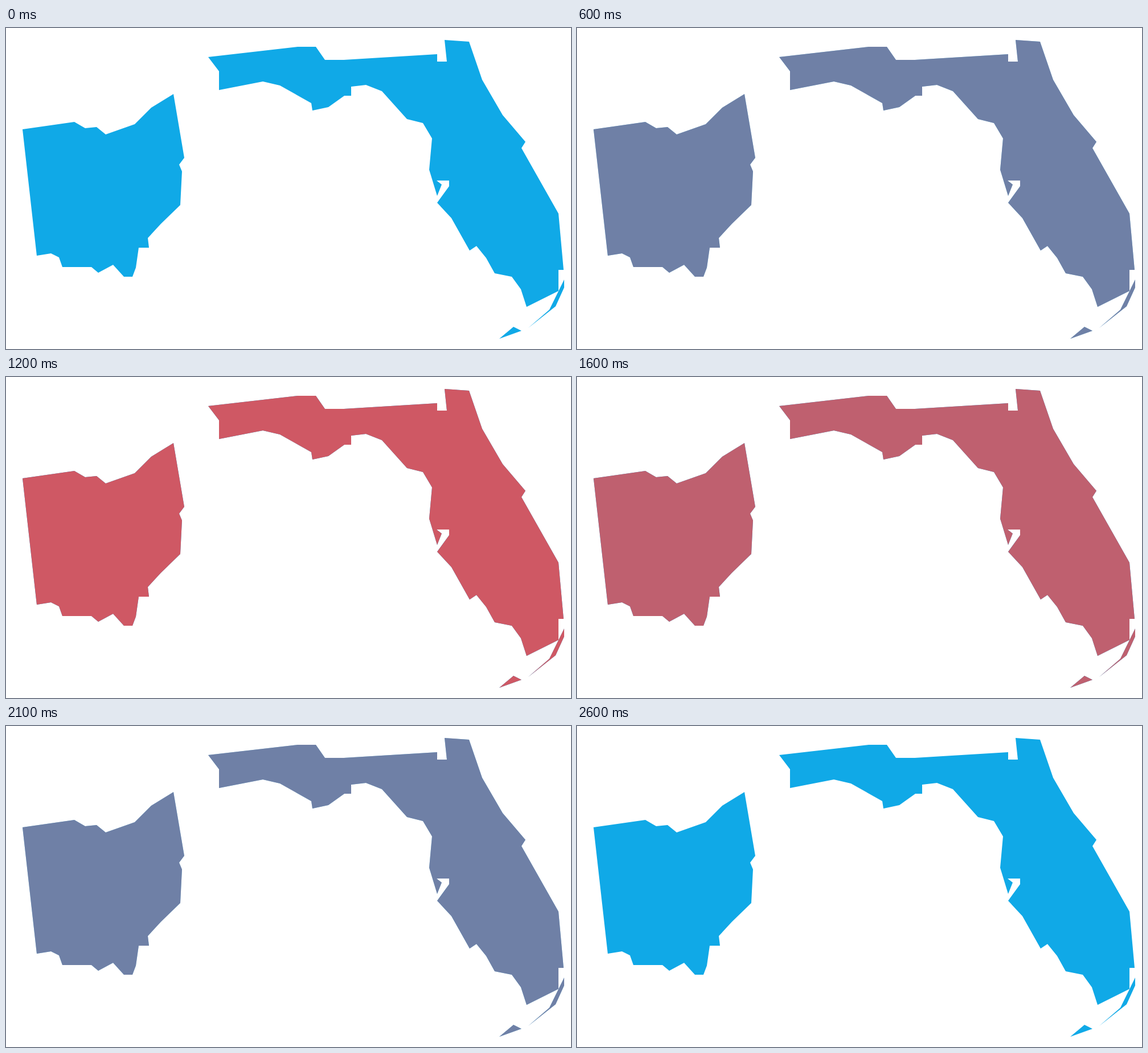
An HTML page that plays this animation: 992x564 px, repeating every 2.8 s.

```html
<!DOCTYPE html>
<html lang="en">
<head>
<meta charset="utf-8">
<title>Two states</title>
<style>
  html, body { margin: 0; width: 100%; height: 100%; overflow: hidden; background: #fff; }
  svg { display: block; width: 100%; height: 100%; }
  .base { fill: #10a9e7; }
  .tint { fill: #e0525a; opacity: 0; animation: fade 2800ms infinite; }

  /* Blue holds 200 ms at each end; 100 ms steps between. */
  @keyframes fade {
    0%       { opacity: 0; animation-timing-function: step-end; }
    7.1428%  { opacity: .1538; animation-timing-function: steps(12, jump-none); }
    50%      { opacity: 1; animation-timing-function: steps(12, jump-none); }
    92.857%  { opacity: .1538; animation-timing-function: step-end; }
    92.8571% { opacity: 0; animation-timing-function: step-end; }
    100%     { opacity: 0; }
  }
</style>
</head>
<body>
<svg viewBox="0 0 992 564">
  <defs>
    <g id="states">
      <!-- Ohio -->
      <path d="M29 178 120 165 139 176 159 174 175 187 226 169 255 140 294 116 313 228
        304 240 309 252 306 311 272 344 249 369 251 386H233L228 421 222 437H207L188 416
        162 430 150 420H99L93 403 79 396 54 400Z"/>
      <!-- Florida mainland -->
      <path d="M355 51 512 33H544L560 56H593L757 46V59H774L770 21 813 24 836 91 872 153
        912 200 905 211 970 326 979 425H970V462L914 490 904 459 888 437 858 431 843 404
        826 383 814 391 782 334 757 307 778 278V268H756L765 275 757 295 743 249 748 194
        732 167 704 160 660 111 632 100 606 103V119H594L566 139 538 145 536 132 481 101
        451 94 374 109V76Z"/>
      <!-- Florida Keys -->
      <path d="M980 442V456L965 489 917 527 954 495Z"/>
      <path d="M866 546 891 525 905 532Z"/>
    </g>
  </defs>
  <use class="base" href="#states"/>
  <use class="tint" href="#states"/>
</svg>
</body>
</html>
```
